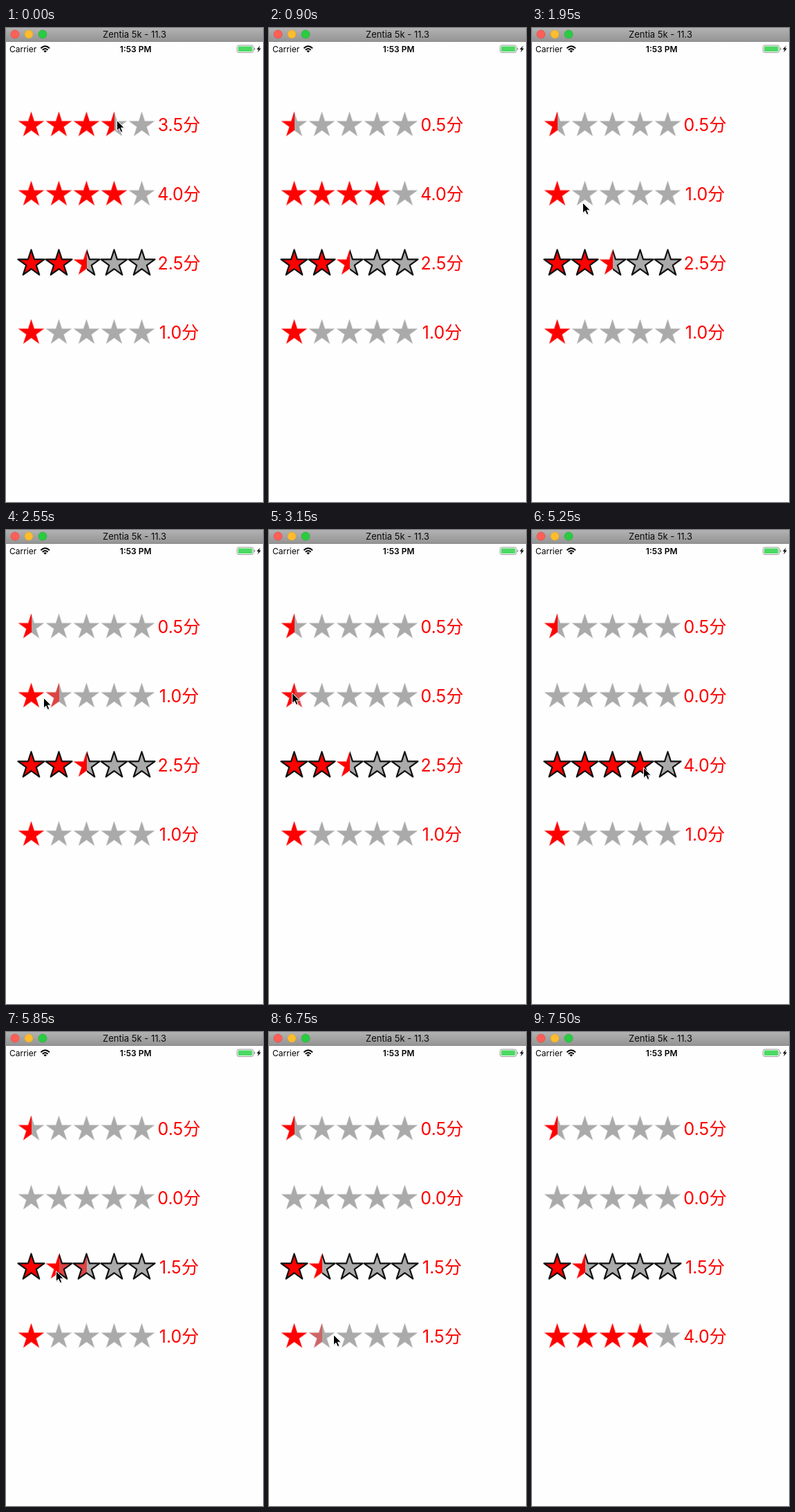
Recreate the animation shown at these times as an HTML page. Size 372 by 685 pixels, loop 8.1 s.

```html
<!DOCTYPE html>
<html lang="en">
<head>
<meta charset="utf-8">
<title>Star rating</title>
<style>
  html, body { margin: 0; width: 100%; height: 100%; overflow: hidden; background: #fefefe; }
  svg { display: block; width: 372px; height: 685px; }
  text { font-family: Inter, Roboto, "Liberation Sans", sans-serif; }
  .score { font: 25px Inter, "Noto Sans CJK SC", "Noto Sans CJK", sans-serif; fill: #f00; text-anchor: middle; }
  polygon { stroke-linejoin: round; }
</style>
</head>
<body>
<svg viewBox="0 0 372 685" xmlns="http://www.w3.org/2000/svg">
  <defs>
    <linearGradient id="bar" x2="0" y2="1">
      <stop offset="0" stop-color="#b2b2b2"/>
      <stop offset="1" stop-color="#939393"/>
    </linearGradient>
    <clipPath id="leftHalf"><rect x="-24" y="-24" width="24.5" height="48"/></clipPath>
    <clipPath id="rightHalf"><rect x=".5" y="-24" width="24" height="48"/></clipPath>
  </defs>
  <rect width="372" height="685" fill="#fefefe"/>

  <rect width="372" height="20" fill="url(#bar)"/>
  <rect y="19" width="372" height="1" fill="#858585"/>
  <g stroke-width=".6">
    <circle cx="13" cy="9" r="6" fill="#ff5f57" stroke="#df4640"/>
    <circle cx="33" cy="9" r="6" fill="#ffbd2e" stroke="#dd9f25"/>
    <circle cx="53" cy="9" r="6" fill="#29cc41" stroke="#1dab30"/>
  </g>
  <text x="186" y="14" font-size="13" text-anchor="middle" fill="#0a0a0a">Zentia 5k - 11.3</text>

  <text x="5" y="34.6" font-size="12">Carrier</text>
  <g fill="none" stroke="#000" stroke-width="2">
    <path d="M50.4 29.2Q56.7 23.4 63 29.2"/>
    <path d="M52.8 31.8Q56.7 28.2 60.6 31.8"/>
  </g>
  <path d="M54.4 33.2Q56.7 31.2 59 33.2L56.7 35.6Z"/>
  <text x="187.7" y="34.6" font-size="12" font-weight="600" text-anchor="middle">1:53 PM</text>
  <rect x="334.5" y="25" width="23.5" height="10.5" rx="2.5" fill="none" stroke="#999"/>
  <rect x="336" y="26.5" width="20.5" height="7.5" rx="1.2" fill="#4cd964"/>
  <path d="M359 28.3q1.6 .6 1.6 2t-1.6 2z" fill="#999"/>
  <path d="M367.6 25.5L363 31h2.6l-1.4 4.2L369 29.4h-2.7z"/>

  <g id="rows"></g>
  <g id="cursor">
    <path d="M1 1.5V16.6L4.6 13.2L7 18.4L9.5 17.3L7.2 12.2H12Z" opacity=".22"/>
    <path d="M.5 .5V15.4L3.9 12.2L6.3 17.6L8.9 16.4L6.5 11.2H11.2Z" stroke="#fff"/>
  </g>
</svg>
<script>
const LOOP = 8100, STEP = 150;
const LEFT = 18, HALF_STAR = 20, OUTLINED_ROW = 2;
const INITIAL = [7, 8, 5, 2]; // in half stars
const FADE = 0.4;

const rowsLayer = document.getElementById("rows");
const cursor = document.getElementById("cursor");

// Pointer path: each leg lasts a number of steps; a leg with a row drags that row's rating.
const path = [{ t: 0, x: 160, y: 133 }];
const last = () => path[path.length - 1];
const glide = (steps, x, y, row, hidden = false) =>
  path.push({ t: last().t + steps * STEP, x, y, row, hidden });
const rest = (steps, row) => glide(steps, last().x, last().y, row);
const vanish = (steps, x, y) => glide(steps, x, y, undefined, true);

glide(5, 27, 135, 0);
rest(1);
vanish(2, 36, 183);

glide(2, 150, 240);
glide(2, 40, 244, 1);
glide(1, 73, 252);
glide(7, 41, 236, 1);
glide(1, 33, 235, 1);
glide(3, 3, 246, 1);

glide(3, 48, 305);
glide(1, 46, 311);
glide(2, 22, 336, 2);
glide(4, 168, 346, 2);
glide(1, 161, 343, 2);
glide(4, 72, 345, 2);

glide(3, 55, 444);
glide(1, 38, 438);
rest(1);
glide(1, 93, 437, 3);
glide(1, 168, 438, 3);
rest(1, 3);
rest(1);
glide(1, 281, 530);
rest(1);
vanish(4, 160, 133);

function pointerAt(t) {
  const i = path.findIndex(p => p.t > t);
  const a = path[i - 1], b = path[i];
  const k = (t - a.t) / (b.t - a.t);
  const ease = k * k * (3 - 2 * k);
  return {
    x: a.x + (b.x - a.x) * ease,
    y: a.y + (b.y - a.y) * ease,
    row: b.row,
    hidden: b.hidden
  };
}

// Ratings follow the pointer half a step late.
const history = [INITIAL];
for (let t = STEP; t < LOOP; t += STEP) {
  const ratings = [...history[history.length - 1]];
  const { x, row } = pointerAt(t - STEP / 2);
  if (row !== undefined) {
    ratings[row] = Math.min(10, Math.max(0, Math.ceil((x - LEFT) / HALF_STAR)));
  }
  history.push(ratings);
}

function add(parent, tag, attrs) {
  const node = document.createElementNS("http://www.w3.org/2000/svg", tag);
  for (const key in attrs) node.setAttribute(key, attrs[key]);
  return parent.appendChild(node);
}

function starPoints(radius) {
  return Array.from({ length: 10 }, (_, i) => {
    const r = i % 2 ? radius * 0.382 : radius;
    const a = i * Math.PI / 5;
    return `${(r * Math.sin(a)).toFixed(2)},${(-r * Math.cos(a)).toFixed(2)}`;
  }).join(" ");
}

function makeStar(x, y) {
  const g = add(rowsLayer, "g", { transform: `translate(${x} ${y})` });
  return ["leftHalf", "rightHalf"].map(id =>
    add(add(g, "g", { "clip-path": `url(#${id})` }), "polygon", {}));
}

function paintHalf(polygon, red, outlined) {
  const dim = Math.round(170 * (1 - red));
  const color = `rgb(${Math.round(170 + 85 * red)},${dim},${dim})`;
  const look = outlined
    ? { points: starPoints(20), stroke: "#111", "stroke-width": 2.2, "stroke-opacity": 1 }
    : { points: starPoints(19), stroke: color, "stroke-width": 1.6, "stroke-opacity": 0.3 };
  for (const key in look) polygon.setAttribute(key, look[key]);
  polygon.setAttribute("fill", color);
}

const rows = INITIAL.map((_, row) => {
  const y = 140.5 + row * 100;
  return {
    stars: Array.from({ length: 5 }, (_, i) => makeStar(36.5 + 40 * i, y)),
    score: add(rowsLayer, "text", { class: "score", x: 250.5, y: y + 8.5 })
  };
});

function drawRow(row, before, now) {
  const { stars, score } = rows[row];
  const red = half => (before > half) * (1 - FADE) + (now > half) * FADE;
  stars.forEach(([left, right], i) => {
    const isHalf = now === 2 * i + 1;
    paintHalf(left, red(2 * i), row === OUTLINED_ROW && !isHalf);
    paintHalf(right, red(2 * i + 1), row === OUTLINED_ROW);
  });
  score.textContent = (now / 2).toFixed(1) + "分";
}

function render(time) {
  const step = Math.floor((time % LOOP) / STEP);
  const now = history[step], before = history[Math.max(0, step - 1)];
  rows.forEach((_, row) => drawRow(row, before[row], now[row]));

  const { x, y, hidden } = pointerAt(step * STEP);
  cursor.setAttribute("visibility", hidden ? "hidden" : "visible");
  cursor.setAttribute("transform", `translate(${Math.round(x)} ${Math.round(y)})`);
}

const began = performance.now();
function tick() {
  render(performance.now() - began);
  requestAnimationFrame(tick);
}
tick();
</script>
</body>
</html>
```
